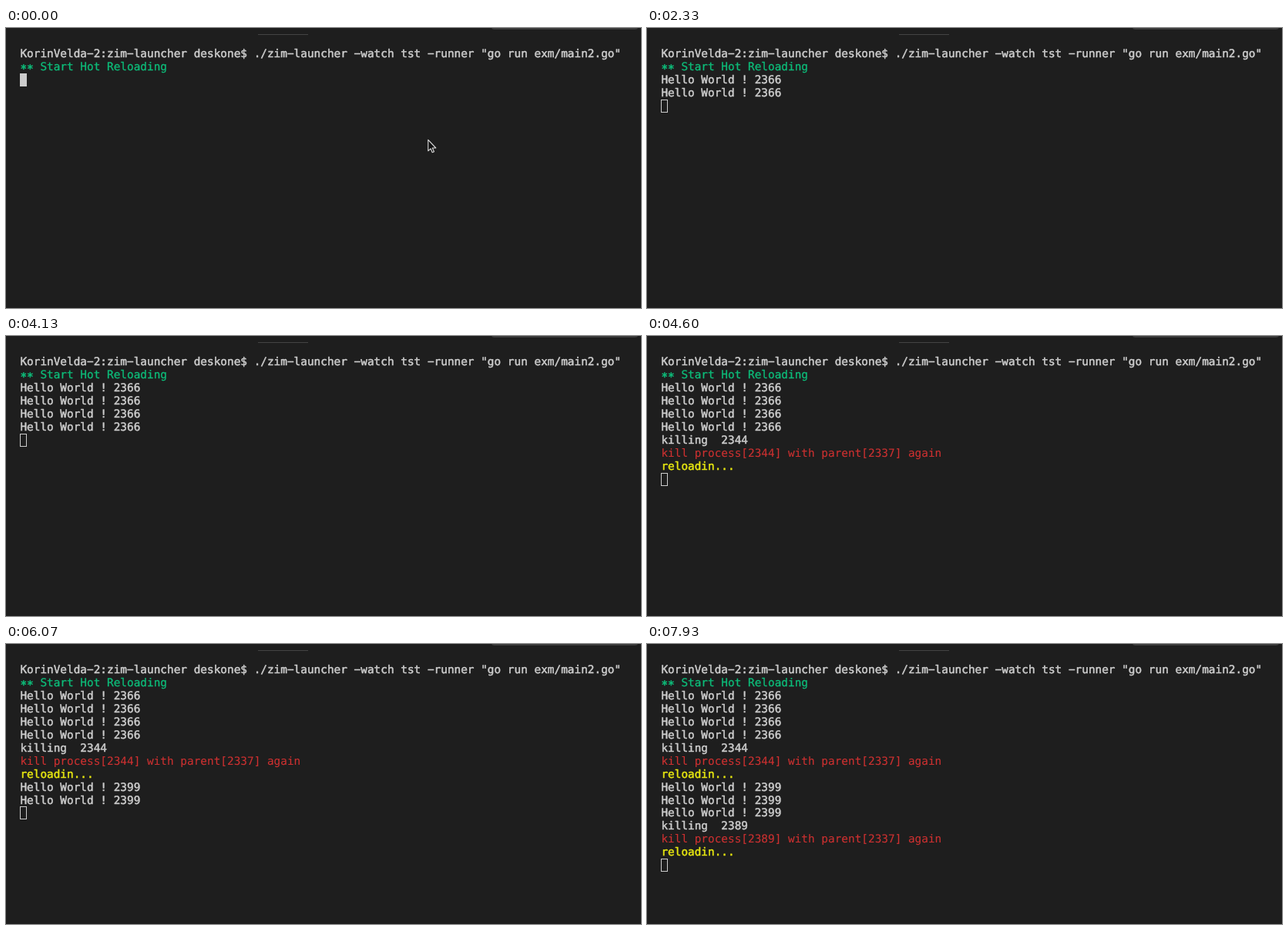
An HTML page that plays this animation: 824 by 364 pixels, repeating every 8000 ms.

```html
<!DOCTYPE html>
<html lang="en">
<head>
<meta charset="utf-8">
<title>Hot reload terminal</title>
<style>
  html, body { margin: 0; width: 100%; height: 100%; overflow: hidden; background: #1e1e1e; }
  svg { display: block; width: 100vw; height: 100vh; }
  text {
    font: 14.4px "DejaVu Sans Mono", Menlo, monospace;
    font-variant-ligatures: none;
    text-rendering: geometricPrecision;
    white-space: pre;
    stroke-linejoin: round;
  }
  .plain { fill: #ccc; stroke: #ccc; stroke-width: .5px; }
  .green { fill: #0dbc79; stroke: #0dbc79; stroke-width: .3px; }
  .red { fill: #cd3131; stroke: #cd3131; stroke-width: .1px; }
  .yellow { fill: #e5e510; stroke: #e5e510; stroke-width: .5px; }
  .stars { stroke-width: .6px; }
</style>
</head>
<body>
<svg viewBox="0 0 824 364">
  <rect width="824" height="364" fill="#1e1e1e"/>
  <rect x="327" y="8" width="65" height="1" fill="#444"/>
  <path d="M630 0H820Q819 2 816 2H634Q631 2 630 0Z" fill="#3c3c3c"/>
  <g id="lines"></g>
  <rect id="caret" stroke="#ccc"/>
  <path id="pointer" d="M547.8 145.3V159.8L551 156.8L553.2 161.8L555.5 160.8L553.3 156H557.8Z"
    fill="#111" stroke="#ddd" stroke-width="1.1" stroke-linejoin="round"/>
</svg>
<script>
const LOOP = 8000, POINTER_GONE = 800, FOCUS_LOST = 2130;
const $ = id => document.getElementById(id);

const script = [];
const print = (at, text, style = "plain") => script.push({ at, text, style });
const hello = (at, pid) => print(at, `Hello World ! ${pid}`);
const kill = (at, pid) => {
  print(at, `killing  ${pid}`);
  print(at, `kill process[${pid}] with parent[2337] again`, "red");
  print(at, "reloadin...", "yellow");
};

print(0, 'KorinVelda-2:zim-launcher deskone$ ./zim-launcher -watch tst -runner "go run exm/main2.go"');
print(0, "** Start Hot Reloading", "green");
[1000, 2000, 3000, 4000].forEach(at => hello(at, 2366));
kill(4530, 2344);
[4870, 6000, 6930].forEach(at => hello(at, 2399));
kill(7800, 2389);

// Wide hyphens and lowered asterisks suit the terminal face.
const markup = text => text
  .replace(/-/g, "\u2212")
  .replace(/^(\*+)(.*)/, '<tspan class="stars" dy="3">$1</tspan><tspan dy="-3">$2</tspan>');

// Rows are slightly under 17px, so the lower ones sit one pixel higher.
const baseline = row => 38 + 17 * row - (row > 10);
const rowTop = row => 25 + 17 * row - (row > 10);

function set(node, attrs) {
  for (const key in attrs) node.setAttribute(key, attrs[key]);
}

for (const [row, line] of script.entries()) {
  line.node = document.createElementNS("http://www.w3.org/2000/svg", "text");
  line.node.innerHTML = markup(line.text);
  set(line.node, { class: line.style, x: 18.4, y: baseline(row) });
  $("lines").append(line.node);
}

function draw(t) {
  let rows = 0;
  for (const { at, node } of script) {
    const shown = t >= at;
    set(node, { visibility: shown ? "visible" : "hidden" });
    rows += shown;
  }
  const top = rowTop(rows);
  set($("caret"), {
    x: 18.5, y: top + .5, width: 8, height: rowTop(rows + 1) - top - 1,
    fill: t < FOCUS_LOST ? "#ccc" : "none"
  });
  set($("pointer"), { visibility: t < POINTER_GONE ? "visible" : "hidden" });
}

const start = performance.now();
function tick() {
  draw((performance.now() - start) % LOOP);
  requestAnimationFrame(tick);
}
tick();
</script>
</body>
</html>
```
